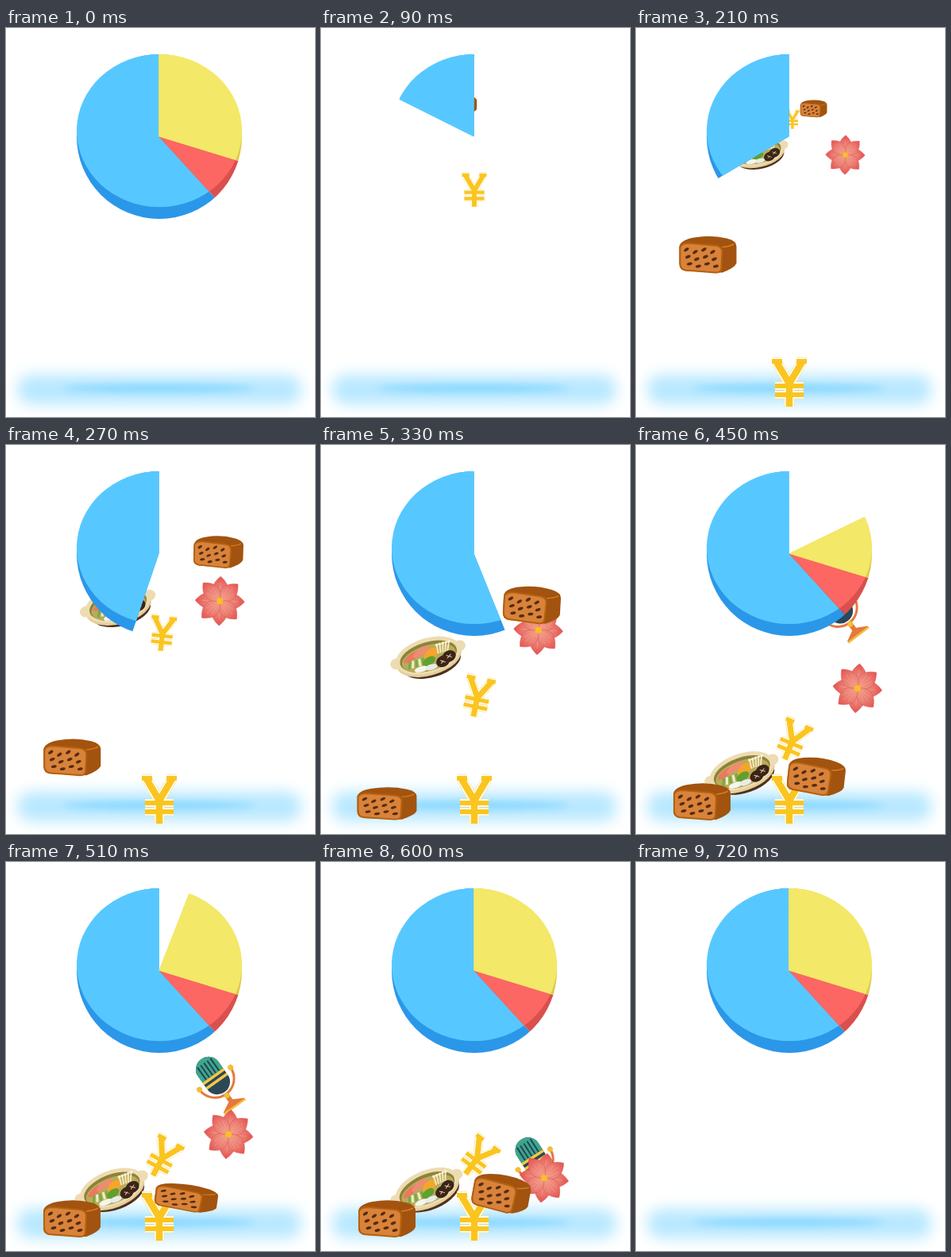
Recreate the animation shown at these times as an HTML page with a canvas. Size 389x489 px, loop 750 ms.

```html
<!DOCTYPE html>
<html lang="en">
<head>
<meta charset="utf-8">
<title>Pie chart</title>
<style>
html, body { margin: 0; width: 100%; height: 100%; overflow: hidden; background: #fff; }
canvas { display: block; }
</style>
</head>
<body>
<canvas id="stage" width="389" height="489"></canvas>
<script>
const ctx = document.getElementById('stage').getContext('2d');
const LOOP = 750, STEP = 30, TAU = Math.PI * 2;

const clamp = v => Math.min(1, Math.max(0, v));
const mix = (a, b, u) => a + (b - a) * u;
const easeOut = u => 1 - (1 - u) ** 3;

function ellipse(x, y, rx, ry, color, rot = 0) {
  ctx.fillStyle = color;
  ctx.beginPath();
  ctx.ellipse(x, y, rx, ry, rot, 0, TAU);
  ctx.fill();
}

function shape(path, color) {
  ctx.fillStyle = color;
  ctx.fill(new Path2D(path));
}

function line(path, color, width) {
  ctx.strokeStyle = color;
  ctx.lineWidth = width;
  ctx.stroke(new Path2D(path));
}

function drawGlow() {
  ctx.save();
  ctx.filter = 'blur(9px)';
  ctx.fillStyle = 'rgba(87,200,255,.42)';
  ctx.beginPath();
  ctx.roundRect(14, 436, 358, 37, 18);
  ctx.fill();
  ctx.filter = 'blur(4px)';
  ellipse(192, 453, 120, 5, 'rgba(87,200,255,.5)');
  ctx.restore();
}

const SLICES = [
  { end: 222.5, top: '#57c8ff', side: '#2b97e9' },
  { end: 253, top: '#fc6663', side: '#d9504c' },
  { end: 360, top: '#f3e868', side: '#dccb4c' }
];
// Key points of the wipe: time, degrees counter-clockwise from the top.
const WIPE = [[0, 0], [90, 63.5], [210, 120.5], [360, 222.5], [390, 253], [540, 360]];

function wipeAngle(t) {
  if (t === 0 || t >= 540) return 360;
  const i = WIPE.findIndex(key => key[0] > t);
  const [t0, a0] = WIPE[i - 1], [t1, a1] = WIPE[i];
  return mix(a0, a1, (t - t0) / (t1 - t0));
}

function drawPie(t) {
  const limit = wipeAngle(t);
  const radians = deg => -(deg + 90) * TAU / 360;
  let from = 0;
  for (const { end, top, side } of SLICES) {
    const to = Math.min(end, limit);
    if (to <= from) break;
    ctx.save();
    ctx.beginPath();
    ctx.moveTo(192.5, 136.5);
    ctx.arc(192.5, 136.5, 160, radians(from), radians(to), true);
    ctx.clip();
    ellipse(193, 136.5, 104, 103.5, side);
    ellipse(193, 129, 104, 96, top);
    // Above the middle the face reaches the full outline.
    ctx.beginPath();
    ctx.rect(80, 20, 230, 116);
    ctx.clip();
    ellipse(193, 136.5, 104, 103.5, top);
    ctx.restore();
    from = end;
  }
}

function yen() {
  const arms = 'M-16 -26L0 1L16 -26M0 0V30';
  const bars = 'M-22 -27H-9M9 -27H22M-18 4H18M-18 15H18';
  ctx.lineJoin = 'round';
  for (const [color, grow] of [['#fce397', 4.5], ['#fff', 3], ['#fac520', 0]]) {
    line(arms, color, 8.5 + grow);
    line(bars, color, 6 + grow);
  }
}

function loaf() {
  const front = 'M-35 -9Q-33 -14 -24 -14L10 -11Q18 -10 18 -3L17 17Q17 23 10 23L-28 20Q-35 19 -35 11Z';
  shape('M-36 -10Q-34 -18 -18 -21Q4 -25 24 -20Q36 -17 36 -10V11Q34 17 18 23L-28 21Q-36 20 -36 12Z', '#a2530f');
  shape(front, '#d98239');
  line(front, '#b4610f', 2);
  line('M18 -9Q28 -10 33 -13', '#d57b1e', 1.5);
  for (let i = 0; i < 12; i++) {
    const row = i % 3, col = Math.floor(i / 3);
    ellipse(-27 + col * 11 + row * 2, -6 + row * 9 + col % 2 * 3, 3.5, 1.8, '#542c14', -.6 + row * .2);
  }
}

function pot() {
  ctx.rotate(-.2);
  ellipse(2, 9, 38, 19, '#50301f');
  ellipse(0, 4, 42, 21, '#e3cf98');
  for (const side of [-1, 1]) ellipse(side * 41, -1, 8, 7, '#eddcb2');
  ellipse(0, 0, 42, 22, '#eddcb2');
  ellipse(0, 1, 37, 18, '#8d8238');
  ellipse(0, 3, 35, 16, '#b9ab5c');
  ellipse(-20, -4, 12, 4, '#eb7860', -.35);
  ellipse(-7, -7, 12, 4, '#f08b72', -.3);
  ellipse(4, -1, 10, 6, '#f5a52c', -.4);
  for (let i = 0; i < 5; i++) {
    line(`M${13 + i * 3} 1L${14 + i * 4} -10`, '#f7e9be', 2);
    ellipse(14 + i * 4, -10, 2, 1.6, '#fff3d2');
    line(`M${-28 + i * 5} 10L${-24 + i * 4} 1`, i % 2 ? '#e8f0cd' : '#76ad3b', 3);
  }
  ellipse(-1, 7, 9, 5, '#61a02e', -.3);
  ellipse(-13, 14, 9, 3.5, '#f5f5ee');
  ellipse(0, 15, 8, 3.5, '#e7ece9');
  for (const [x, y] of [[16, 12], [25, 8]]) {
    ellipse(x, y, 9, 7, '#3c2418', -.2);
    line(`M${x - 3} ${y - 2}l6 4m0 -4l-6 4`, '#e6cfaa', 1);
  }
}

function flower() {
  const petal = 'M0 0C-13 -9 -13 -20 0 -31C13 -20 13 -9 0 0Z';
  const shade = ctx.createRadialGradient(0, 0, 3, 0, 0, 31);
  ['#f39a84', '#eb8075', '#e5524f'].forEach((c, i) => shade.addColorStop(i / 2, c));
  for (let i = 0; i < 8; i++) {
    ctx.save();
    ctx.rotate((i * 2 + (i > 3)) * TAU / 8);
    shape(petal, shade);
    line(petal, 'rgba(217,72,70,.55)', .8);
    line('M0 -5V-23M-2 -6L-5 -19M2 -6L5 -19', 'rgba(250,182,160,.5)', .7);
    ctx.restore();
  }
  ellipse(0, 0, 4, 4, '#f8c022');
}

function mic() {
  line('M-24 -12A24 24 0 0 0 24 -12', '#e6793b', 3);
  shape('M-3 13H3V22L16 29V32H-16V29L-3 22Z', '#e6793b');
  line('M-16 31H16', '#f5bf3d', 2.5);
  ctx.save();
  ctx.beginPath();
  ctx.roundRect(-16, -42, 32, 51, 16);
  ctx.clip();
  ctx.fillStyle = '#2b4858';
  ctx.fillRect(-16, -42, 32, 51);
  ctx.fillStyle = '#3da68d';
  ctx.fillRect(-16, -42, 32, 25);
  for (let x = -10; x <= 10; x += 5) line(`M${x} -36V-17`, '#264453', 2);
  ctx.restore();
  line('M-16 -15H16M-16 -8H16', '#f6c744', 3.5);
  for (const [x, y] of [[-24, -12], [24, -12], [0, 14]]) ellipse(x, y, 3.5, 3.5, '#f5bd35');
}

// Each item flies between two points in a time span; listed back to front.
const ITEMS = [
  { draw: mic, span: [345, 660], from: [229, 95], to: [275, 452], tilt: -.7, spin: .5 },
  { draw: flower, span: [150, 690], from: [256, 123], to: [281, 452], spin: .3 },
  { draw: pot, span: [150, 430], from: [175, 135], to: [133, 410], gravity: 1.7, spin: -.45 },
  { draw: yen, span: [45, 195], from: [193, 100], to: [193, 446] },
  { draw: yen, span: [200, 380], from: [197, 60], to: [197, 372], gravity: .6, spin: 1.6, size: .84 },
  { draw: loaf, span: [75, 300], from: [200, 80], to: [83, 448], gravity: 1.15, squash: .2 },
  { draw: loaf, span: [200, 450], from: [186, 100], to: [227, 416], gravity: 1.75, bulge: 56, spin: .45, squash: .3 }
];

function drawItem(t, { draw, span: [start, land], from, to,
  gravity = 1, bulge = 0, tilt = 0, spin = 0, size = 1, squash = 0 }) {
  if (t < start) return;
  const u = clamp((t - start) / (land - start));
  const x = mix(from[0], to[0], easeOut(u)) + bulge * Math.sin(Math.PI * Math.sqrt(u));
  const y = mix(from[1], to[1], u ** gravity);
  const scale = size * mix(.4, 1, clamp((t - start) / 90));
  const flat = squash * Math.sin(Math.PI * clamp((t - land) / 150));
  ctx.save();
  ctx.translate(x, y + flat * 20);
  ctx.rotate(tilt + spin * (t - start) / 1000);
  ctx.scale(scale * (1 + flat / 3), scale * (1 - flat));
  draw();
  ctx.restore();
}

function render(now) {
  const t = Math.floor(now % LOOP / STEP) * STEP;
  ctx.fillStyle = '#fff';
  ctx.fillRect(0, 0, 389, 489);
  drawGlow();
  ctx.globalAlpha = clamp((720 - t) / 120);
  for (const item of ITEMS) drawItem(t, item);
  ctx.globalAlpha = 1;
  drawPie(t);
}

const start = performance.now();
function tick() {
  render(performance.now() - start);
  requestAnimationFrame(tick);
}
tick();
</script>
</body>
</html>
```
